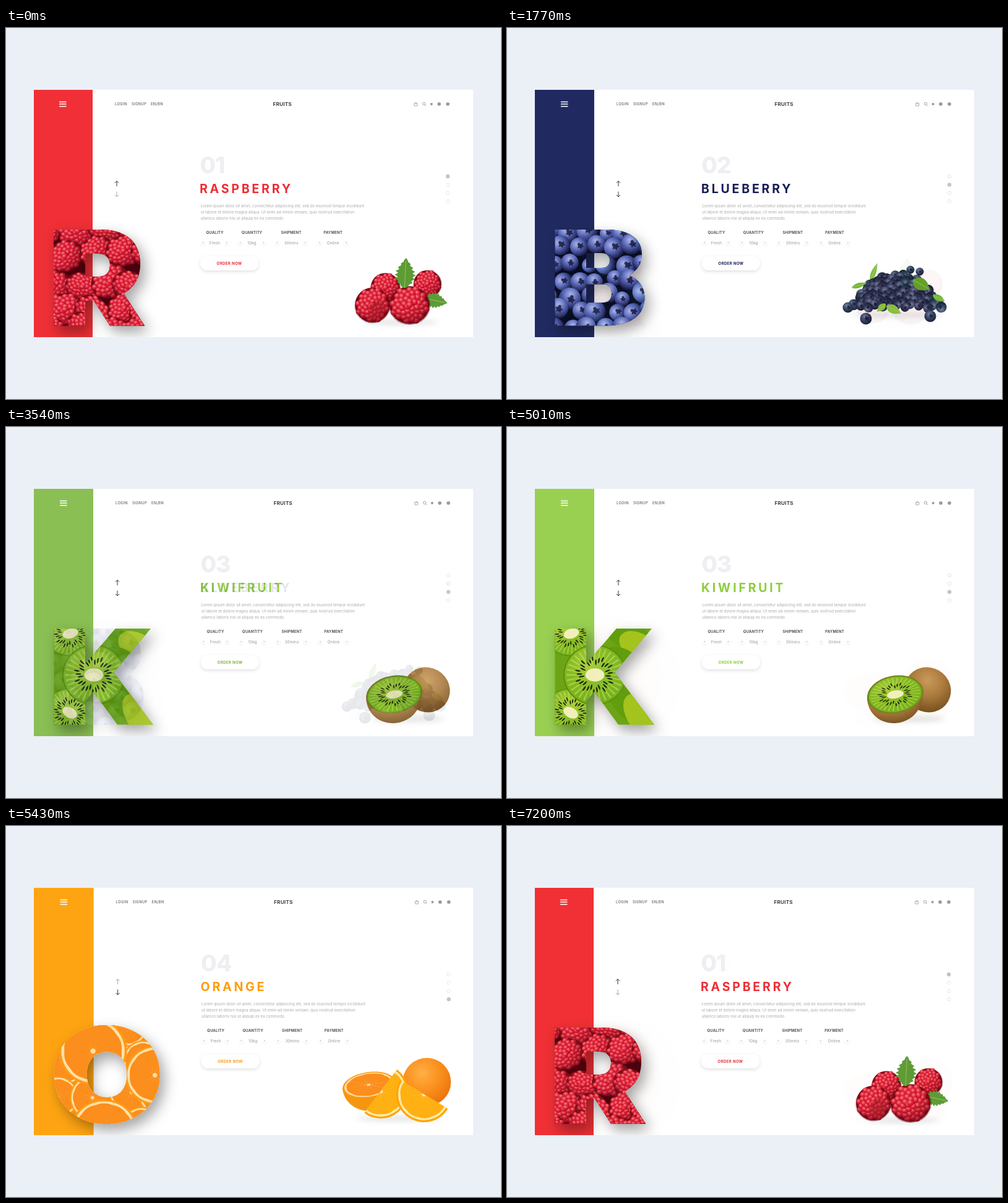
These frames come from a looping animation (800 by 600 pixels, 7230 ms). An HTML page:

```html
<!DOCTYPE html>
<html lang="en">
<head>
<meta charset="utf-8">
<title>Fruits</title>
<style>
  html, body { margin: 0; width: 100%; height: 100%; overflow: hidden; background: #ebf0f7; }
  svg { display: block; width: 800px; height: 600px; font-family: Inter, "Open Sans", sans-serif; }
</style>
</head>
<body>
<svg id="stage" viewBox="0 0 800 600"></svg>
<script>
const LOOP = 7230, FIRST_FADE = 1380, PERIOD = 1800, FADE = 450, STEP = 30;

let seed = 11;
const random = () => (seed = seed * 16807 % 2147483647) / 2147483647;
const between = (a, b) => +(a + (b - a) * random()).toFixed(1);
const times = (n, f) => Array.from({ length: n }, (_, i) => f(i)).join('');

// Basic shapes
const circle = (x, y, r, fill, more = '') => `<circle cx="${x}" cy="${y}" r="${r}" fill="${fill}" ${more}/>`;
const ellipse = (x, y, rx, ry, fill, rot = 0, more = '') =>
  `<ellipse rx="${rx}" ry="${ry}" fill="${fill}" transform="translate(${x} ${y}) rotate(${rot})" ${more}/>`;
const path = (d, fill, more = '') => `<path d="${d}" fill="${fill}" ${more}/>`;
const line = (d, color, width) => path(d, 'none', `stroke="${color}" stroke-width="${width}"`);
const text = (x, y, size, weight, fill, str, spacing = 0, anchor = 'start') =>
  `<text x="${x}" y="${y}" font-size="${size}" font-weight="${weight}" fill="${fill}" letter-spacing="${spacing}" text-anchor="${anchor}">${str}</text>`;
const gradient = (id, ...colors) => `<radialGradient id="${id}" cx=".4" cy=".32" r=".7">` +
  colors.map((c, i) => `<stop offset="${i / (colors.length - 1)}" stop-color="${c}"/>`).join('') + '</radialGradient>';

// Fruit symbols have radius 1 and are placed with a scale
const symbol = (id, body) => `<g id="${id}">${body}</g>`;
const put = (id, x, y, rx, ry = rx, rot = 0) =>
  `<use href="#${id}" transform="translate(${x} ${y}) rotate(${rot}) scale(${rx} ${ry})"/>`;

// Covers the letter area with overlapping fruit on a loose grid
const scatter = (id, step, rMin, rMax, stretch = 1) => times(Math.ceil(200 / step), row =>
  times(Math.ceil(220 / step), col => {
    const r = between(rMin, rMax), jitter = step * .2;
    return put(id, 72 + (col + row % 2 / 2) * step + between(-jitter, jitter),
      328 + row * step * .9 + between(-jitter, jitter), r * stretch, r, between(-50, 50));
  }));

// Leaf along the x axis, with optional teeth
function leaf(x, y, len, width, rot, fill, tooth = 0) {
  const n = 16, side = sign => Array.from({ length: n + 1 }, (_, i) => {
    const t = i / n, half = width * Math.sin(Math.PI * t ** .8) * (i % 2 ? 1 : 1 - tooth);
    return [(t * len).toFixed(1), (sign * half).toFixed(1)].join();
  });
  return `<g transform="translate(${x} ${y}) rotate(${rot})">` +
    `<polygon points="${[...side(1), ...side(-1).reverse()].join(' ')}" fill="${fill}"/>` +
    line(`M1 0H${len * .9}`, '#a9d06c', .7) + '</g>';
}
const ground = (x, y, rx, ry) => ellipse(x, y, rx, ry, '#888', 0, 'opacity=".25" filter="url(#soft)"');

const raspberry = circle(0, 0, .95, '#7c0a18') + times(46, i => {
  const n = 45 - i, a = n * 2.4, d = .85 * Math.sqrt(n / 45);
  return circle((d * Math.cos(a)).toFixed(3), (d * Math.sin(a)).toFixed(3), .155, 'url(#drupe)');
}) + circle(0, 0, 1, 'url(#shade)');
const blueberry = fill => circle(0, 0, 1, `url(#${fill})`) +
  path('M.1-.42L.25-.2L.5-.2L.38 0L.5.2L.23.17L.08.36L0 .14L-.25.08L-.08-.1L-.12-.33Z', '#0c1330', 'opacity=".8"');
const kiwi = circle(0, 0, 1, '#5b8f10') + circle(0, 0, .96, 'url(#flesh)') +
  times(32, i => `<g transform="rotate(${i * 11.25})">` +
    path('M.2 0L.9-.03V.03Z', '#d2e86a', 'opacity=".5"') +
    ellipse(.42 + i % 3 * .07, .03, .09, .025, '#1e2b08') + '</g>') +
  ellipse(0, 0, .3, .22, '#f2f0bd');
const orange = (rim, pith, flesh) => circle(0, 0, 1, rim) + circle(0, 0, .93, pith) +
  times(10, i => path('M.1 0L.78-.23Q.88 0 .78 .23Z', flesh,
    `stroke="${flesh}" stroke-width=".06" stroke-linejoin="round" transform="rotate(${i * 36 + 18})"`));

const letters = {
  R: 'M78 326H154C197 326 218 348 218 382C218 404 208 420 191 429L225 481.500H169L143 441H129V481.500H78ZM129 365V402H150C163 402 169 395 169 383.500C169 372 163 365 150 365Z',
  B: 'M77.500 326H161C198 326 218 341 218 366C218 381 210 393 197 400C213 406 222.500 419 222.500 436C222.500 466 198 481.500 159 481.500H77.500ZM128 364V388H152C161 388 166 384 166 376C166 368 161 364 152 364ZM128 414.500V444H155C165 444 169 438 169 429C169 420 165 414.500 155 414.500Z',
  K: 'M77.500 326H128V383L177 326H234L174 397L238 481.500H180L141 428L128 443V481.500H77.500Z',
  O: 'M77 402C77 355 112 322 162 322S248 355 248 402S212 482 162 482S77 449 77 402ZM130 402C130 425 143 439 162.500 439S195 425 195 402S182 365 162.500 365S130 379 130 402Z'
};

// Letter fillings
const textures = {
  R: () => scatter('raspberry', 46, 23, 28, 1.2),
  B: () => scatter('blueberry', 29, 12, 18),
  K: () => times(6, i => ellipse(195 + i % 2 * 25, 335 + i * 27, 44, 24, i % 2 ? '#a3c41f' : '#5f9e0c', 30 + i * 5)) +
    put('kiwi', 104, 334, 42, 36, -15) + put('kiwi', 103, 462, 42, 38, 30) + put('kiwi', 142, 401, 51, 49),
  O: () => scatter('orange', 62, 30, 38) +
    put('orange', 240, 403, 48) + put('orange', 140, 364, 55) + put('orange', 158, 489, 53, 47)
};

// Groups at the lower right
const groups = {
  R: () => ground(640, 476, 60, 4) + put('raspberry', 614, 420, 25) + put('raspberry', 682, 414, 23.5) +
    leaf(677, 437, 38, 13, 12, '#5c9c38', .25) +
    put('raspberry', 593, 448, 29.5) + ellipse(600, 455, 12, 15, '#a51a28', 15, 'opacity=".5"') +
    put('raspberry', 653, 448, 34, 32) + leaf(645, 421, 49, 17, -87, '#5d9b35', .3),
  B: () => ground(630, 464, 75, 4) + leaf(587, 409, 31, 4, -68, '#79bd33') +
    times(80, i => {
      const k = i / 79, across = i * .618 % 1 * 2 - 1;
      return put('navy', (630 + across * (44 + 34 * k)).toFixed(1), (397 + 18 * across ** 2 * (1 - k) + 56 * k).toFixed(1),
        between(7, 9), undefined, between(0, 360));
    }) +
    put('navy', 652, 391, 6.5) + put('navy', 667, 394, 6.5) +
    put('navy', 551, 452, 8.5) + put('navy', 580, 470, 9.5) + put('navy', 684, 466, 9.5) +
    leaf(557, 420, 26, 4, -18, '#70b32c') + leaf(656, 407, 32, 10, 30, '#5ea528') +
    leaf(688, 432, 22, 5, 27, '#76b836') + leaf(612, 446, 19, 5, 138, '#86c440') + leaf(613, 449, 27, 7, 28, '#86c440'),
  K: () => ground(650, 472, 58, 5) + ellipse(680, 425, 38, 36, 'url(#brown)', 30) +
    path('M582 437C582 463 603 480 627 479C655 477 674 456 672 424Z', 'url(#brown)') +
    ellipse(627.5, 433, 46, 31, '#9b7038', -10) + put('kiwi', 627.5, 432.5, 45, 29.5, -10),
  O: () => ground(635, 473, 70, 4) + circle(679.5, 414, 39, 'url(#peel)') +
    path('M543 424C546 449 566 462 592 461C616 457 629 435 627 410Z', '#f6960f') +
    put('orange', 585.5, 418.5, 42.5, 20.5, -9) +
    put('wedge', 605, 429, 44, 44, -53) + put('wedge', 675, 434, 45, 45, 31)
};

const scenes = [
  { letter: 'R', name: 'RASPBERRY', side: '#f02f36', accent: '#ef2a33', back: '#4a0610', dx: -1, up: '#333', down: '#aaa' },
  { letter: 'B', name: 'BLUEBERRY', side: '#162a64', accent: '#0b1955', back: '#060b20', dx: 0, up: '#333', down: '#333' },
  { letter: 'K', name: 'KIWIFRUIT', side: '#98d153', accent: '#8bce3a', back: '#6ba512', dx: 0, up: '#333', down: '#333' },
  { letter: 'O', name: 'ORANGE', side: '#fea412', accent: '#ff9b08', back: '#f48a12', dx: .6, up: '#aaa', down: '#333' }
];

const columns = [
  { title: 'QUALITY', value: 'Fresh', x: 338.5, gap: 19 }, { title: 'QUANTITY', value: '10kg', x: 398.5, gap: 18.7 },
  { title: 'SHIPMENT', value: '30mins', x: 462, gap: 22.7 }, { title: 'PAYMENT', value: 'Online', x: 529.5, gap: 21.5 }
];
const lorem = ['Lorem ipsum dolor sit amet, consectetur adipiscing elit, sed do eiusmod tempor incididunt',
  'ut labore et dolore magna aliqua. Ut enim ad minim veniam, quis nostrud exercitation',
  'ullamco laboris nisi ut aliquip ex ea commodo.'];

const stepper = (x, dir) => circle(x, 347.8, 4.6, '#e4e4e8') + circle(x, 347.2, 4.5, '#fff') +
  line(`M${x - dir * .7} 345.800L${x + dir * .7} 347.300L${x - dir * .7} 348.800`, '#999', .7);

const header = () => line('M87 119.500H98.500M87 123H98.500M87 126.700H98.500', '#fff', 1.4) +
  text(177, 125.2, 5.8, 600, '#777', 'LOGIN', .4) + text(204, 125.2, 5.8, 600, '#777', 'SIGNUP', .3) +
  text(235, 125.2, 5.8, 600, '#777', 'EN/BN', .3) + text(447.7, 126, 8.2, 700, '#444', 'FRUITS', .2, 'middle') +
  line('M660.500 122H666L665.500 126H661ZM661.800 122Q663.200 118.500 664.700 122', '#999', .8) +
  circle(676.5, 122.5, 2.2, 'none', 'stroke="#999" stroke-width=".9"') + line('M678.200 124.300L680 126.200', '#999', .9) +
  circle(688.7, 123, 2, '#999') + circle(701, 123, 2.8, '#999') + circle(715, 123, 2.8, '#999');

const details = accent => lorem.map((s, i) => text(315.5, 290 + i * 10.1, 6.2, 400, '#aaa', s, .02)).join('') +
  columns.map(({ title, value, x, gap }) =>
    text(x, 332.7, 6, 700, '#555', title, .15, 'middle') + text(x, 349.5, 6.4, 400, '#999', value, .1, 'middle') +
    stepper(x - gap, -1) + stepper(x + gap, 1)).join('') +
  '<rect x="315" y="369" width="94" height="23" rx="11.500" fill="#fff" filter="url(#lift)"/>' +
  text(362, 383, 6, 700, accent, 'ORDER NOW', .4, 'middle');

const drawScene = (s, i) => `<g class="scene" clip-path="url(#panel)">
  <rect x="45" y="100" width="710" height="400" fill="#fff"/>
  <g transform="translate(${s.dx} 0)">
    <rect x="40" y="100" width="101" height="400" fill="${s.side}"/>
    <g filter="url(#drop)"><g clip-path="url(#letter${s.letter})">
      <rect x="70" y="315" width="185" height="175" fill="${s.back}"/>${textures[s.letter]()}
    </g></g>
    ${header()}
    ${line('M180 256V247.500M177 250.500L180 247.500L183 250.500', s.up, 1)}
    ${line('M180 264.500V273M177 270L180 273L183 270', s.down, 1)}
    ${text(314.5, 235, 37, 800, '#efeff3', '0' + (i + 1), -1)}
    ${text(314, 267.3, 19.5, 700, s.accent, s.name, 3.8)}
    ${details(s.accent)}
    ${times(4, k => k === i ? circle(715, 240 + k * 13.4, 3.2, '#c4c4c4')
      : circle(715, 240 + k * 13.4, 2.8, '#fff', 'stroke="#e2e2e2" stroke-width=".8"'))}
    ${groups[s.letter]()}
  </g></g>`;

const stage = document.getElementById('stage');
stage.innerHTML = `<defs>
  <clipPath id="panel"><rect x="45" y="100" width="710" height="400"/></clipPath>
  <clipPath id="half"><rect x="-1" y="0" width="2" height="1"/></clipPath>
  ${Object.keys(letters).map(k => `<clipPath id="letter${k}"><path clip-rule="evenodd" d="${letters[k]}"/></clipPath>`).join('')}
  <filter id="soft" x="-50%" y="-300%" width="200%" height="700%"><feGaussianBlur stdDeviation="4"/></filter>
  <filter id="drop" x="-30%" y="-30%" width="170%" height="170%"><feDropShadow dx="7" dy="10" stdDeviation="11" flood-opacity=".36"/></filter>
  <filter id="lift" x="-20%" y="-50%" width="140%" height="220%"><feDropShadow dx="0" dy="2" stdDeviation="2.500" flood-color="#556" flood-opacity=".18"/></filter>
  ${gradient('drupe', '#fa828a', '#e2233a', '#ab0d23')}
  ${gradient('shade', 'rgba(90,0,15,0)', 'rgba(90,0,15,0)', 'rgba(90,0,15,.5)')}
  ${gradient('bright', '#a9bbf4', '#4f66b8', '#0d1640')}
  ${gradient('dusky', '#6f7fa3', '#2f3b5a', '#0f172e')}
  ${gradient('flesh', '#a8cf3a', '#82bb22', '#73b01c')}
  ${gradient('brown', '#c99a5b', '#aa7a3e', '#77501f')}
  ${gradient('peel', '#ffb045', '#fb9220', '#ec7409')}
  ${symbol('raspberry', raspberry)}
  ${symbol('blueberry', blueberry('bright'))}
  ${symbol('navy', blueberry('dusky'))}
  ${symbol('kiwi', kiwi)}
  ${symbol('orange', orange('#ff9a14', '#ffe0a6', '#fb8e1c'))}
  <g id="wedge" clip-path="url(#half)">${orange('#ffa400', '#ffe9a8', '#ffb012')}</g>
</defs>${scenes.map(drawScene).join('')}`;

const layers = stage.querySelectorAll('.scene');
const ease = p => p * p * (3 - 2 * p);

function render(now) {
  const t = Math.floor(now % LOOP / STEP) * STEP;
  const since = (t - FIRST_FADE + LOOP) % LOOP;
  const from = Math.min(3, Math.floor(since / PERIOD)), to = (from + 1) % 4;
  const p = ease(Math.min(1, (since - from * PERIOD) / FADE));
  const top = Math.max(from, to), bottom = Math.min(from, to);
  layers.forEach((layer, k) => {
    layer.style.opacity = k === top ? (top === to ? p : 1 - p) : k === bottom ? 1 : 0;
  });
}

const start = performance.now();
function tick() {
  render(performance.now() - start);
  requestAnimationFrame(tick);
}
tick();
</script>
</body>
</html>
```
